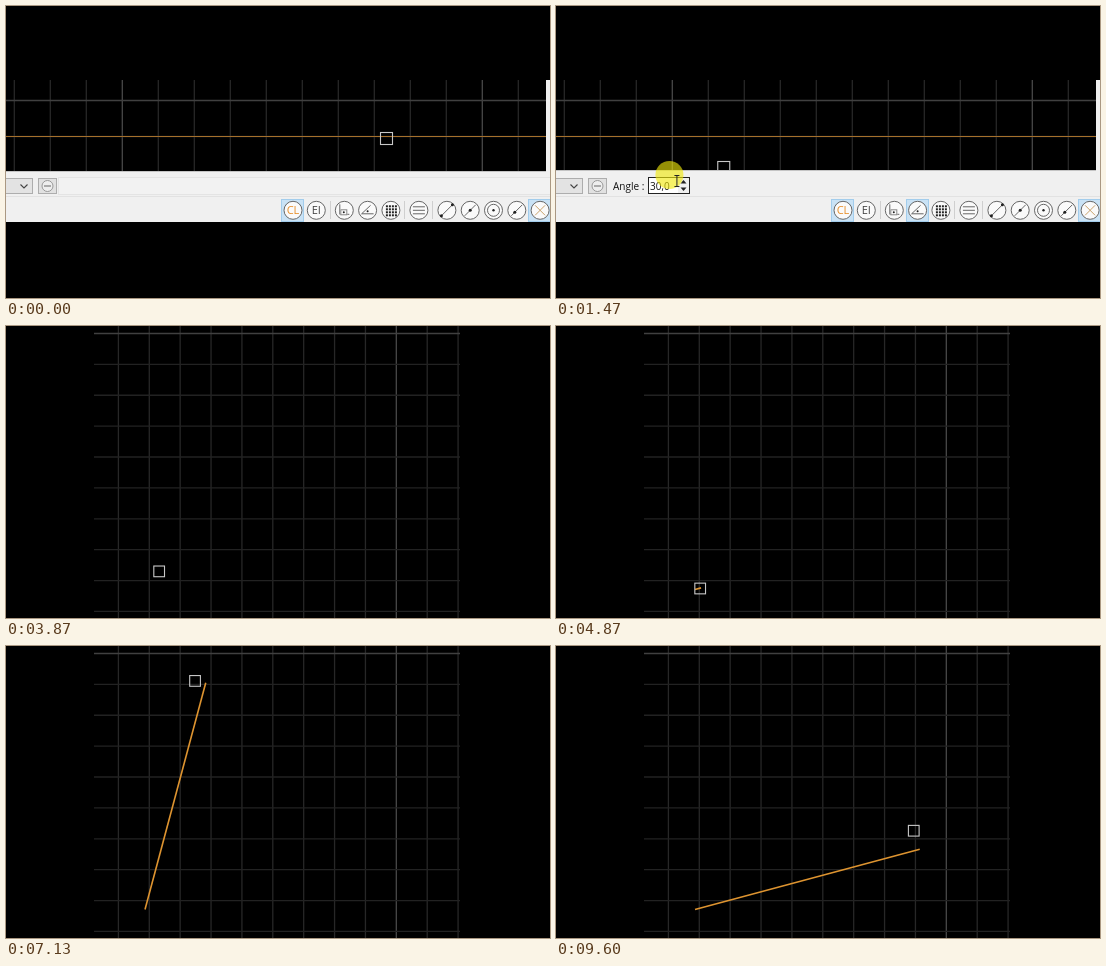
An HTML page with a canvas for the animation above (9.87 s loop, 544 px wide and 292 px high).

```html
<!DOCTYPE html>
<html lang="en">
<head>
<meta charset="utf-8">
<title>Angle snapping</title>
<style>
  html, body { margin: 0; width: 100%; height: 100%; overflow: hidden; background: #000; }
  canvas { display: block; width: 544px; height: 292px; }
</style>
</head>
<body>
<canvas id="stage" width="544" height="292"></canvas>
<script>
const ctx = document.getElementById('stage').getContext('2d');
const LOOP = 9870, STEP = 200 / 3, CUT = 3796;
const INK = '#666', DARK = '#222', EDGE = '#adadad';
const PIVOT = { x: 139, y: 263.5 };
const DEG = Math.PI / 180, SNAP = 15 * DEG;

// Settings: time, x, y.
const mouseKeys = [
  [130, 380.5, 132.5], [400, 361, 205], [800, 361, 205], [1266, 168, 161.5],
  [1466, 121, 175], [1730, 118, 177], [2330, 66, 178], [2800, 66, 178], [3270, 28, 122]
];
// Drawing: time, angle and distance from the pivot.
const sweepKeys = [
  [3870, 52, 23], [4670, 11, 0], [4790, 11, 0], [5670, 10.7, 246], [7130, 77.5, 234],
  [7470, 91, 243], [7720, 91, 243], [8130, 53.4, 251], [8500, 22, 272],
  [8870, 51, 318], [9200, 19.8, 232.5]
];

function slope(keys, i, axis) {
  const a = keys[i - 1], k = keys[i], b = keys[i + 1];
  const turns = !a || !b || (k[axis] - a[axis]) * (b[axis] - k[axis]) <= 0;
  return turns ? 0 : (b[axis] - a[axis]) / (b[0] - a[0]);
}

// Smooth curve through the keys that stops at every turn and rest.
function along(keys, t) {
  const last = keys.length - 1;
  t = Math.max(keys[0][0], Math.min(keys[last][0], t));
  let i = 0;
  while (i < last - 1 && keys[i + 1][0] < t) i++;
  const span = keys[i + 1][0] - keys[i][0], u = (t - keys[i][0]) / span;
  return [1, 2].map(axis => {
    const p = keys[i][axis], q = keys[i + 1][axis];
    const m = slope(keys, i, axis) * span, n = slope(keys, i + 1, axis) * span;
    return p + u * (m + u * (3 * (q - p) - 2 * m - n + u * (2 * (p - q) + m + n)));
  });
}

function rect(x, y, w, h, fill, stroke) {
  ctx.fillStyle = fill;
  ctx.fillRect(x, y, w, h);
  if (!stroke) return;
  ctx.strokeStyle = stroke;
  ctx.lineWidth = 1;
  ctx.strokeRect(x + .5, y + .5, w - 1, h - 1);
}

function line(color, width, ...pts) {
  ctx.strokeStyle = color;
  ctx.lineWidth = width;
  ctx.beginPath();
  for (let i = 0; i < pts.length; i += 2) ctx.lineTo(pts[i], pts[i + 1]);
  ctx.stroke();
}

function disc(x, y, r, fill, stroke = 'transparent') {
  ctx.beginPath();
  ctx.arc(x, y, r, 0, 7);
  ctx.fillStyle = fill;
  ctx.fill();
  ctx.strokeStyle = stroke;
  ctx.lineWidth = 1;
  ctx.stroke();
}

function text(str, x, y, size, color, align = 'left') {
  ctx.font = `${size}px "Open Sans", "Noto Sans", sans-serif`;
  ctx.textAlign = align;
  ctx.fillStyle = color;
  ctx.fillText(str, x, y);
}

function pickBox(x, y, size) {
  ctx.strokeStyle = '#c8c8c8';
  ctx.lineWidth = 1.1;
  ctx.strokeRect(x - size / 2, y - size / 2, size, size);
}

// Toolbar icons, drawn around the centre of their ring.
const label = (str, color) => () => text(str, 0, 4, 11, color, 'center');

const segment = (...dots) => () => {
  line(INK, 1, -5.5, 5.5, 5.5, -5.5);
  dots.forEach(d => disc(d, -d, 1.5, DARK));
};

function ortho() {
  line(INK, 1, -4.5, -6, -4.5, 4, 5, 4);
  rect(-4, -1, 7, 6, '#fafafa', '#888');
  disc(-.5, 2, 1, DARK);
}

function angle() {
  line(INK, 1, 3, -5, -6, 3.5, 6, 3.5);
  disc(0, 1, 1, DARK);
}

function dots() {
  for (let i = 0; i < 16; i++) rect(-5 + i % 4 * 3, -5 + (i >> 2) * 3, 2, 2, DARK);
}

function bars() {
  for (let y = -3.5; y < 4; y += 3.5) line(INK, 1, -6, y, 6, y);
}

function ring() {
  disc(0, 0, 6, '#fafafa', INK);
  disc(0, 0, 1.2, DARK);
}

function cross() {
  for (const d of [-5, 5]) line('#c9a26c', 1, -5, d, 5, -d);
}

const SEPARATOR = null;
const icons = [
  label('CL', '#e8902c'), label('EI', '#444'), SEPARATOR, ortho, angle, dots, SEPARATOR,
  bars, SEPARATOR, segment(-5.5, 5.5), segment(0), ring, segment(-2), cross
];

function iconRow(active) {
  let x = 287;
  icons.forEach((icon, i) => {
    if (icon === SEPARATOR) {
      rect(Math.round(x - 10), 195, 1, 18, '#cfcfcf');
      x += 4.7;
      return;
    }
    const lit = i === 0 || icon === cross || (icon === angle && active);
    if (lit) rect(Math.round(x) - 12, 193, 23, 23, '#c9e2f5', '#a3cdec');
    ctx.save();
    ctx.translate(x, 204.3);
    disc(0, 0, 9, '#fafafa', INK);
    icon();
    ctx.restore();
    x += 23.3;
  });
}

function toolbar(t) {
  const active = t >= 597;
  const top = active ? 164 : 165;
  rect(0, top, 544, 216 - top, '#f0f0f0');
  rect(0, top, 540, 1, '#c4c4c4');
  rect(0, 190, 544, 1, '#e2e2e2');
  rect(-1, 172, 28, 16, '#e3e3e3', EDGE);
  line('#444', 1.1, 14.5, 178.5, 18, 182, 21.5, 178.5);
  rect(32, 172, 19, 16, '#e1e1e1', EDGE);
  disc(41.5, 180, 5.5, '#eee', '#999');
  rect(38, 179, 7, 2, '#aaa');
  iconRow(active);
  if (active) angleField(t);
  else rect(52, 171, 493, 18, '#f2f2f2', '#e4e4e4');
}

function angleField(t) {
  text('Angle :', 57, 183.5, 10, '#111');
  rect(92, 171, 42, 17, '#fff', DARK);
  rect(122, 172, 11, 15, '#f0f0f0');
  for (const d of [-1, 1]) {
    ctx.fillStyle = DARK;
    ctx.beginPath();
    ctx.moveTo(124.5, 179.5 + 2 * d);
    ctx.lineTo(130.5, 179.5 + 2 * d);
    ctx.lineTo(127.5, 179.5 + 5.5 * d);
    ctx.fill();
  }
  const value = t < 2460 ? '30,0' : '15'.slice(0, t < 2590 ? 1 : 2);
  text(value, 94, 183.5, 10, '#111');
  if (t < 1730 || t > 2460) return;
  const from = Math.max(94, Math.min(113, along(mouseKeys, t)[0]));
  ctx.save();
  ctx.beginPath();
  ctx.rect(from, 173, 113 - from, 13);
  ctx.clip();
  rect(94, 173, 19, 13, '#0078d7');
  text(value, 94, 183.5, 10, '#fff');
  ctx.restore();
}

function pointer(x, y) {
  disc(x - 7.5, y - 6, 14, 'rgba(240,232,10,.62)');
  if (x < 134) {
    for (const d of [-5.5, 5.5]) line(DARK, 1, x - 2.5, y + d, x + 2.5, y + d);
    line(DARK, 1, x, y - 5.5, x, y + 5.5);
    return;
  }
  line(DARK, 1, x, y, x, y + 12, x + 3, y + 9, x + 8, y + 8, x, y);
  ctx.fillStyle = '#fff';
  ctx.fill();
}

// Soft grid lines; the axis lines are brighter.
function grid(x0, y0, step, left, right, top, bottom, axisX, axisY) {
  for (let i = 0, x = x0; x < right; x = x0 + ++i * step)
    line(i % 10 === axisX ? '#484848' : '#272727', 1.3, x, top, x, bottom);
  for (let i = 0, y = y0; y < bottom; y = y0 + ++i * step)
    line(i === axisY ? '#404040' : '#222', 1.3, left, y, right, y);
}

function settings(t) {
  grid(8.3, 94.5, 36, 0, 540, 74, 165, 3, 0);
  rect(0, 130, 540, 1, '#a5702c');
  // The box stays where the mouse left the canvas.
  let seen = t;
  while (along(mouseKeys, seen)[1] > 163) seen -= STEP;
  pickBox(...along(mouseKeys, seen), 12);
  rect(540, 74, 4, 92, '#f0f0f0');
  toolbar(t);
  const [x, y] = along(mouseKeys, t);
  if (y > 163) pointer(x, y);
}

function drawing(t) {
  grid(112.4, 7.5, 30.88, 88, 454, 0, 292, 9, 0);
  const [deg, dist] = along(sweepKeys, t);
  const a = deg * DEG, snapped = Math.round(a / SNAP) * SNAP;
  const at = (angle, r) => [PIVOT.x + r * Math.cos(angle), PIVOT.y - r * Math.sin(angle)];
  if (t > 4790)
    line('#de9430', 1.6, PIVOT.x, PIVOT.y, ...at(snapped, dist * Math.cos(a - snapped) + 1));
  pickBox(...at(a, dist), 10.7);
}

function frame() {
  const now = performance.now() % LOOP;
  const t = Math.floor((now + 4) / STEP) * STEP;
  rect(0, 0, 544, 292, '#000');
  (t < CUT ? settings : drawing)(t);
  requestAnimationFrame(frame);
}
frame();
</script>
</body>
</html>
```
